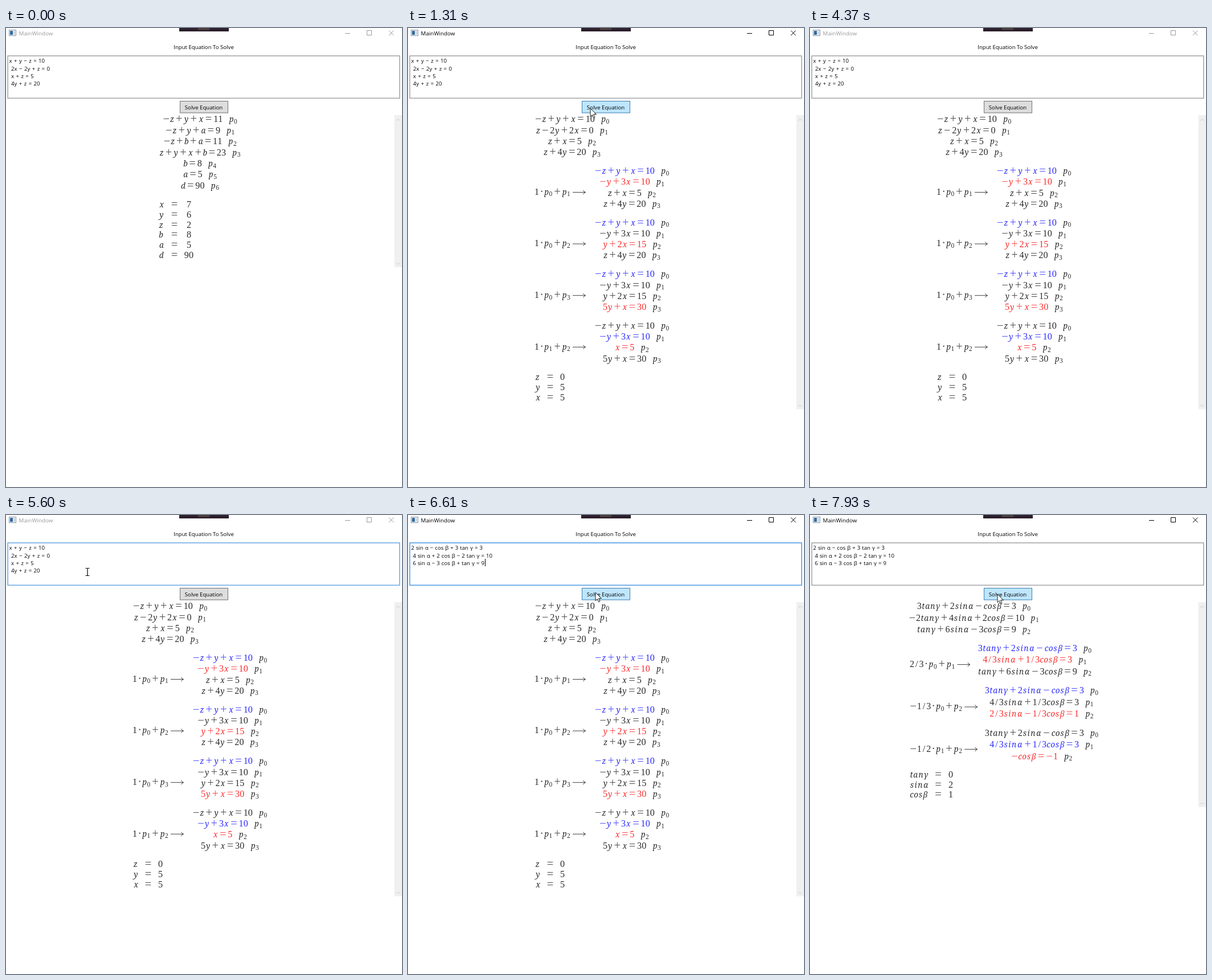
These frames come from a looping animation (695x806 px, 8 s). An HTML page:

```html
<!DOCTYPE html>
<html lang="en">
<head>
<meta charset="utf-8">
<title>MainWindow</title>
<style>
  html, body { margin: 0; width: 100%; height: 100%; overflow: hidden; background: #fff; }
  svg { display: block; width: 100%; height: 100%; }
  .ui text { font: 9.65px "Open Sans", sans-serif; white-space: pre; fill: #000; }
  .ui .caption { font-size: 9.85px; }
  .input text { word-spacing: .95px; }
  .input .trig text { word-spacing: .5px; }
  .chrome { --ink: #999; }
  .chrome.active { --ink: #000; }
  .chrome .caption { fill: var(--ink); }
  .chrome path { stroke: var(--ink); fill: none; }
  .math text { font: 16.2px "Liberation Serif", serif; text-anchor: middle; fill: #2c2c2c; }
  .math .var { font: italic 13.6px "Noto Serif", serif; }
  .math .op { font-size: 20.5px; fill-opacity: .82; }
  .math .sub { font-size: 11.5px; }
  .math .blue { fill: #2c2cfb; }
  .math .red { fill: #fb2c2c; }
  .math path { stroke: #2c2c2c; stroke-width: .9; fill: none; }
</style>
</head>
<body>
<svg viewBox="0 0 695 806" xmlns="http://www.w3.org/2000/svg">
  <rect width="695" height="806" fill="#fff"/>
  <g class="ui">
    <rect x="304" width="87" height="6" fill="#2c1f2c"/>
    <path d="M337 .8h20M337 2.8h20" stroke="#75614f" stroke-width=".8"/>
    <rect x="5.5" y="3.5" width="12" height="10" fill="#f4f6f8" stroke="#8b98a6"/>
    <rect x="7" y="5" width="5" height="7" fill="#34699c"/>
    <rect x="13" y="5" width="3" height="7" fill="#cbd5de"/>
    <g id="chrome" class="chrome">
      <text class="caption" x="22.5" y="12.6">MainWindow</text>
      <path d="M595 9.5h9M633.5 4.5h8v8h-8zM672 4.5l8.5 8.5M680.5 4.5L672 13"/>
    </g>
    <text x="347" y="37.2" text-anchor="middle">Input Equation To Solve</text>
    <rect id="box" x="3.2" y="48.9" width="687.6" height="74.4" fill="#fff" stroke-width="1.6"/>
    <g id="selection" fill="#99c9ef">
      <rect x="6" y="51" width="64" height="13.4"/><rect x="6" y="64.4" width="72" height="13.4"/>
      <rect x="6" y="77.8" width="43" height="13.4"/><rect x="6" y="91.2" width="54" height="13.4"/>
    </g>
    <g id="input" class="input"></g>
    <rect id="caret" width="1" height="13"/>
    <rect id="button" x="305.5" y="128.5" width="84" height="20.5"/>
    <text x="347" y="142.8" text-anchor="middle">Solve Equation</text>
  </g>
  <g id="math" class="math"></g>
  <path id="arrow" d="M0 0v14.6l3.4-3.2 2.2 5.3 2.3-1-2.2-5.2h4.7z" fill="#fff" stroke="#000" stroke-width=".9"/>
  <path id="beam" d="M-3.5-6.5h2.6l.9.8.9-.8h2.6M-3.5 6.5h2.6l.9-.8.9.8h2.6M0-6v12" fill="none" stroke="#000" stroke-width="1.2"/>
</svg>
<script>
const $ = id => document.getElementById(id);
const LOOP = 8000;

// Math layout: advance widths in em, every glyph centred in its cell
const EM = 16.4, GAP = 2.1;
const ADVANCE = { x: .572, y: .52, z: .465, a: .529, b: .429, d: .52, p: .503, t: .361, n: .6,
                  s: .469, i: .345, c: .433, o: .485, 'α': .64, 'β': .566, 'γ': .518, '·': .278 };

function layout(source) {
  const cells = [];
  let x = 0, color = '', previous = '=';
  const put = (ch, kind, width) => {
    cells.push({ ch, kind, x: x + width / 2, color });
    x += width;
  };
  for (const ch of source) {
    if (ch === '*') color = 'blue';
    else if (ch === '!') color = 'red';
    else if (ch === ' ') { x += 11; color = ''; }
    else if (ch === '⟶') { x += 4; put(ch, 'arrow', 23); }
    else if ('+−=·'.includes(ch)) {
      const unary = ch === '−' && previous === '=';
      const gap = unary ? 0 : GAP;
      x += gap;
      put(ch, 'op', (ADVANCE[ch] || .778) * EM);
      x += gap;
    }
    else if (previous === 'p') put(ch, 'sub', 6.3);
    else if (/[\d/]/.test(ch)) put(ch, 'num', .5 * EM);
    else put(ch, 'var', ADVANCE[ch] * EM);
    if (!'*!'.includes(ch)) previous = ch;
  }
  return { cells, width: x };
}

function formula(source, x, middle, centred) {
  const { cells, width } = layout(source);
  const left = centred ? x - width / 2 : x;
  const base = middle + 5.3;
  let spans = '', extra = '';
  for (const c of cells) {
    const cx = (left + c.x).toFixed(2);
    if (c.kind === 'arrow')
      extra += `<path d="M${cx - 11.5} ${middle + 1}h22.5m-4-3.6q1.2 2.8 4 3.6q-2.8.8-4 3.6"/>`;
    else {
      const drop = { op: 1, sub: 2.6 }[c.kind] || 0;
      spans += `<tspan class="${c.kind} ${c.color}" x="${cx}" y="${base + drop}">${c.ch}</tspan>`;
    }
  }
  return `<text>${spans}</text>${extra}`;
}

const system = (x, top, pitch, rows) => rows.split('|')
  .map((row, i) => formula(`${row} p${i}`, x, top + i * pitch, true)).join('');

const solution = (left, equals, value, top, rows) => rows.split('|').map((row, i) => {
  const [name, number] = row.split('='), y = top + i * 17.7;
  return formula(name, left, y) + formula('=', equals, y, true) + formula(number, value, y, true);
}).join('');

const scrollbar = bottom => `<rect x="681.5" y="153" width="13.5" height="${bottom - 153}" fill="#f0f0f0"/>
  <path d="M685 163l3.3-3.3 3.3 3.3M685 ${bottom - 8}l3.3 3.3 3.3-3.3" style="stroke:#c4c4c4"/>`;

const views = [
  scrollbar(420) +
  system(340.5, 160, 19.4, '−z+y+x=11|−z+y+a=9|−z+b+a=11|z+y+x+b=23|b=8|a=5|d=90') +
  solution(268.5, 295.5, 321, 310, 'x=7|y=6|z=2|b=8|a=5|d=90'),

  scrollbar(669.5) +
  system(288, 160, 19.2, '−z+y+x=10|z−2y+2x=0|z+x=5|z+4y=20') +
  [
    ['1·p0+p1⟶', '*−z+y+x=10|!−y+3x=10|z+x=5|z+4y=20'],
    ['1·p0+p2⟶', '*−z+y+x=10|−y+3x=10|!y+2x=15|z+4y=20'],
    ['1·p0+p3⟶', '*−z+y+x=10|−y+3x=10|y+2x=15|!5y+x=30'],
    ['1·p1+p2⟶', '−z+y+x=10|*−y+3x=10|!x=5|5y+x=30'],
  ].map(([label, rows], i) => {
    const top = 250.8 + i * 90.6;
    return formula(label, 222, top + 36.7) + system(393, top, 19.25, rows);
  }).join('') +
  solution(223.5, 249.5, 271, 613, 'z=0|y=5|x=5'),

  scrollbar(513) +
  system(287.5, 160, 20.3, '3tanγ+2sinα−cosβ=3|−2tanγ+4sinα+2cosβ=10|tanγ+6sinα−3cosβ=9') +
  [
    ['2/3·p0+p1⟶', 394.5, '*3tanγ+2sinα−cosβ=3|!4/3sinα+1/3cosβ=3|tanγ+6sinα−3cosβ=9'],
    ['−1/3·p0+p2⟶', 406.5, '*3tanγ+2sinα−cosβ=3|4/3sinα+1/3cosβ=3|!2/3sinα−1/3cosβ=1'],
    ['−1/2·p1+p2⟶', 406.5, '3tanγ+2sinα−cosβ=3|*4/3sinα+1/3cosβ=3|!−cosβ=−1'],
  ].map(([label, x, rows], i) => {
    const top = 233.6 + i * 74.4;
    return formula(label, 175, top + 28) + system(x, top, 20.4, rows);
  }).join('') +
  solution(175, 225, 247, 455.7, 'tanγ=0|sinα=2|cosβ=1'),
];
$('math').innerHTML = views.map(view => `<g>${view}</g>`).join('');

const inputs = {
  linear: 'x + y − z = 10| 2x − 2y + z = 0| x + z = 5| 4y + z = 20',
  trig: '2 sin α − cos β + 3 tan γ = 3| 4 sin α + 2 cos β − 2 tan γ = 10| 6 sin α − 3 cos β + tan γ = 9',
};
$('input').innerHTML = Object.entries(inputs).map(([name, lines]) => `<g class="${name}">` + lines.split('|')
  .map((line, i) => `<text x="5.5" y="${61.2 + i * 13.4}">${line}</text>`).join('') + '</g>').join('');

// Pointer strokes: start, end, number of steps, quadratic curve
const moves = [
  [150, 930, 11, [613, 795], [480, 330], [293, 152]],
  [1010, 1310, 5, [312, 143], [320, 141], [320, 141]],
  [2020, 2630, 9, [312, 145], [180, 168], [-14, 203]],
  [5370, 5600, 4, [6, 208], [90, 150], [143, 100]],
  [5680, 5830, 3, [146, 98], [148, 96], [148, 96]],
  [6280, 6610, 5, [165, 98], [290, 118], [329, 136]],
  [6690, 6830, 3, [329, 137], [329, 138], [329, 139]],
];

function pointer(t) {
  const move = moves.filter(m => t >= m[0]).pop();
  if (!move) return [-50, -50];
  const [start, end, steps, a, b, c] = move;
  const step = (end - start) / (steps - 1);
  const u = Math.min(1, Math.floor((t - start) / step + .05) / (steps - 1));
  const e = 1 - (1 - u) ** 1.5;
  return a.map((v, i) => v * (1 - e) ** 2 + 2 * b[i] * e * (1 - e) + c[i] * e * e);
}

const during = (t, from, to) => t >= from && t < to;
const show = (node, on) => node.style.display = on ? '' : 'none';
const pick = (parent, index) => [...parent.children].forEach((child, i) => show(child, i === index));
const paint = (node, fill, stroke) => {
  node.setAttribute('fill', fill);
  node.setAttribute('stroke', stroke);
};

function render(t) {
  const [x, y] = pointer(t);
  const overBox = during(x, 3, 691) && during(y, 49, 123);
  const overButton = during(x, 305, 390) && during(y, 128, 149);
  const pressed = during(t, 1160, 1310) || during(t, 7780, 7930);
  const focused = during(t, 5760, 7780);
  const pasted = t >= 6210;

  $('chrome').classList.toggle('active', during(t, 1160, 4370) || t >= 5760);
  paint($('box'), '#fff', focused ? '#569de5' : overBox ? '#72ade6' : '#a6a8ac');
  if (pressed) paint($('button'), '#c4e5f6', '#2c628b');
  else if (overButton) paint($('button'), '#bee6fd', '#3c7fb1');
  else paint($('button'), '#ddd', '#707070');

  show($('selection'), during(t, 6060, 6210));
  pick($('input'), pasted ? 1 : 0);
  pick($('math'), t < 1310 ? 0 : t < 7930 ? 1 : 2);

  show($('caret'), focused && !during(t, 6060, 6210) && !during(t, 6910, 7400));
  $('caret').setAttribute('x', pasted ? 135 : 60);
  $('caret').setAttribute('y', pasted ? 77 : 91.5);

  const visible = x >= 0;
  show($('arrow'), visible && !overBox);
  show($('beam'), visible && overBox);
  for (const id of ['arrow', 'beam']) $(id).setAttribute('transform', `translate(${x} ${y})`);
}

const began = performance.now();
function tick() {
  render((performance.now() - began) % LOOP);
  requestAnimationFrame(tick);
}
tick();
</script>
</body>
</html>
```
